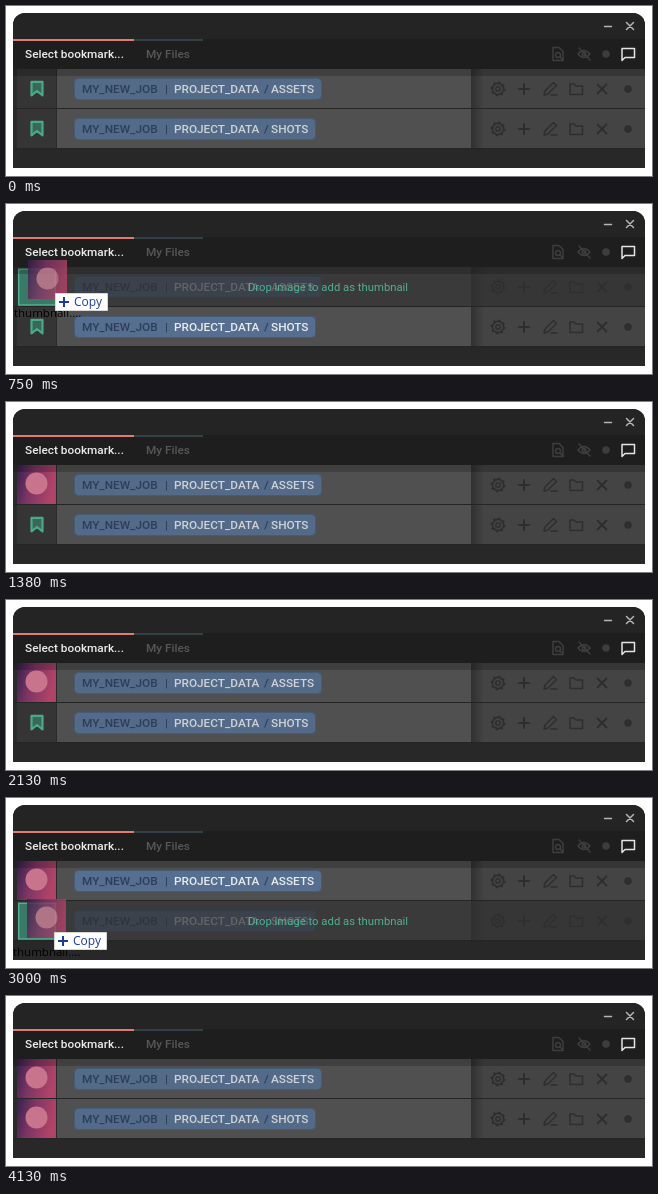
These frames come from a looping animation (646x170 px, 4260 ms). An HTML page:

```html
<!DOCTYPE html>
<html lang="en">
<head>
<meta charset="utf-8">
<title>Thumbnail drop</title>
<style>
  html, body { margin: 0; width: 100%; height: 100%; overflow: hidden; background: #fff; }
  svg { display: block; }
  text { font: 500 11.8px Roboto, sans-serif; }
  .line { fill: none; stroke-width: 1.5; stroke-linecap: round; stroke-linejoin: round; }
  .tools { stroke: #2e2e2e; }
  .dark { fill: #2b3f5a; }
  .light { fill: #cfd3d8; }
  .bright .light { fill: #e9ecef; }
  .bright .chip { fill: #566f90; }
  .hint { font-weight: 400; font-size: 11.3px; fill: #4fb092; text-anchor: middle; }
  .system { font: 400 11.5px "Open Sans", sans-serif; }
</style>
</head>
<body>
<svg id="stage" width="646" height="170" viewBox="0 0 646 170">
  <defs>
    <linearGradient id="art" x2="1" y2=".25">
      <stop offset="0" stop-color="#35204d"/>
      <stop offset=".45" stop-color="#7d3564"/>
      <stop offset="1" stop-color="#b04368"/>
    </linearGradient>
    <linearGradient id="side">
      <stop offset="0" stop-color="#303030"/>
      <stop offset="1" stop-color="#444"/>
    </linearGradient>
    <linearGradient id="under" x2="0" y2="1">
      <stop offset="0" stop-opacity=".22"/>
      <stop offset="1" stop-opacity="0"/>
    </linearGradient>
    <clipPath id="frame"><path d="M7 162V19a12 12 0 0 1 12-12H627a12 12 0 0 1 12 12V162z"/></clipPath>
    <clipPath id="floor"><path d="M0 0H646V162H0z"/></clipPath>
    <g id="thumb">
      <path fill="url(#art)" d="M0 0H39V39H0z"/>
      <circle cx="19.5" cy="18.5" r="11" fill="#c9748d"/>
    </g>
    <path id="mark" d="M25.5 12.8h11v13.6l-5.5-4.4-5.5 4.4z" fill="#376858" stroke="#4ba88b" stroke-width="2.2" stroke-linejoin="round"/>
    <path id="cross" d="M-4.5-4.5l9 9m0-9l-9 9"/>
    <path id="plus" d="M0-5V5M-5 0H5"/>
    <g id="tools" class="line tools">
      <circle cx="492" cy="20" r="5.6" stroke-width="1.7"/>
      <circle cx="492" cy="20" r="2.2"/>
      <circle cx="492" cy="20" r="6.8" stroke-width="1.4" stroke-dasharray="2.2 3.14" stroke-linecap="butt"/>
      <use href="#plus" x="518" y="20" stroke-width="2"/>
      <path d="M538 26l1-4 8.500-8.500 3 3-8.500 8.500-4 1M545 26h6"/>
      <path d="M564 15h4l2 2h6.500v8.500H564z"/>
      <use href="#cross" x="596" y="20" stroke-width="1.8"/>
      <circle cx="622" cy="20" r="3" fill="#2e2e2e"/>
    </g>
  </defs>

  <g clip-path="url(#frame)">
    <path fill="#282828" d="M0 0H646V170H0z"/>
    <path fill="#242424" d="M0 0H646V33H0z"/>
    <path fill="#1e1e1e" d="M0 33H646V63H0z"/>
    <path fill="#e17a72" d="M7 33H128V35H7z"/>
    <path fill="#344144" d="M128 33H197V35H128z"/>
    <g class="line" stroke="#b5b5b5" stroke-width="1.2">
      <path d="M598.500 20.500h7"/>
      <path d="M620.500 16.500l7 7m0-7l-7 7"/>
    </g>
    <text x="19" y="52" fill="#ececec">Select bookmark...</text>
    <text x="140" y="52" fill="#575757">My Files</text>
    <g class="line" stroke="#3d3d3d">
      <path d="M547 41.500h6l4 4v9h-10z"/>
      <circle cx="552" cy="49" r="2.500"/>
      <path d="M554 51l3 3M572 48q6-7 12 0q-6 7-12 0M573 42l11 12"/>
      <circle cx="578" cy="48" r="1.800"/>
      <circle cx="600" cy="48" r="3" fill="#3d3d3d"/>
      <path stroke="#e4e4e4" d="M616 42.500h12.500v9h-9.500l-3 3z"/>
    </g>
    <g id="rows"></g>
    <path fill="url(#under)" d="M7 63H639V70H7zM7 143H639V149H7z"/>
  </g>

  <g clip-path="url(#floor)">
    <g id="drag">
      <use href="#thumb" opacity=".82"/>
      <use id="add" href="#plus" x="40" y="44"/>
      <g id="tip">
        <text class="system" x="-14" y="57">thumbnail....</text>
        <path fill="#fff" stroke="#d5d5d5" d="M27.500 33.500h52v17h-52z"/>
        <use href="#plus" x="36" y="42" stroke="#1e3c9a" stroke-width="2"/>
        <text class="system" x="46" y="46" fill="#1e3c9a" style="font-size:12px">Copy</text>
      </g>
    </g>
  </g>
</svg>
<script>
const LOOP = 4260, STEP = 125;
const $ = id => document.getElementById(id);
const show = (el, on) => el.setAttribute('visibility', on ? 'inherit' : 'hidden');

const row = (y, name, width) => `
  <g transform="translate(0 ${y})">
    <path fill="#2b2b2b" d="M7 0H51V39H7z"/>
    <path fill="#353535" d="M11 0H50V39H11z"/>
    <path fill="#505050" d="M51 0H465V39H51z"/>
    <path fill="#444" d="M465 0H639V39H465z"/>
    <path fill="url(#side)" d="M465 0H478V39H465z"/>
    <use href="#mark" class="mark"/>
    <use href="#thumb" class="art" x="11"/>
    <rect class="chip" x="68.500" y="9.500" width="${width}" height="21" rx="4" fill="#536a88" stroke="#465b76"/>
    <text x="76" y="24" class="dark">MY_NEW_JOB</text>
    <text x="159" y="24" class="dark">|</text>
    <text x="168" y="24" class="light">PROJECT_DATA</text>
    <text x="258" y="24" class="dark">/</text>
    <text x="265" y="24" class="light">${name}</text>
    <use href="#tools"/>
    <g class="drop">
      <path fill="#303030" opacity=".68" d="M7 0H639V39H7z"/>
      <path fill="#397966" stroke="#4fb092" stroke-width="1.500" d="M12.700 2.200H49.500V38H12.700z"/>
      <text class="hint" x="322" y="24">Drop image to add as thumbnail</text>
    </g>
    <path fill="#252525" d="M7 39H639V40H7z"/>
  </g>`;
$('rows').innerHTML = row(63, 'ASSETS', 247) + row(103, 'SHOTS', 241);

// One drag per row: first step, step the row lights up, step the tip opens, then x,y per step.
const drags = [
  { start: 2, hover: 4, tip: 6,
    path: [[-30, 46], [-14, 40], [4, 35], [18, 33], [22, 56], [22, 62], [23, 67], [23, 70], [23, 71]] },
  { start: 19, hover: 21, tip: 22,
    path: [[-28, 126], [-14, 121], [-2, 113], [12, 107], [20, 103], [21, 101], [21, 100]] }
];
const rows = [...$('rows').children];
$('add').outerHTML = `<g id="add" class="line">
  <use href="#plus" x="40" y="44" stroke="#fff" stroke-width="5"/>
  <use href="#plus" x="40" y="44" stroke="#1e3c9a" stroke-width="2"/></g>`;

function draw(time) {
  const n = Math.min(33, Math.floor(time % LOOP / STEP));
  const active = drags.find(d => n >= d.start && n < d.start + d.path.length);
  const lit = active && n >= active.hover;

  rows.forEach((el, i) => {
    const d = drags[i], target = lit && d === active;
    const done = n >= d.start + d.path.length;
    show(el.querySelector('.drop'), target);
    show(el.querySelector('.mark'), !done);
    show(el.querySelector('.art'), done);
    el.classList.toggle('bright', !!lit && !target);
  });

  show($('drag'), active);
  if (active) {
    const [x, y] = active.path[n - active.start];
    $('drag').setAttribute('transform', `translate(${x} ${y})`);
  }
  show($('tip'), active && n >= active.tip);
  show($('add'), lit && n < active.tip);
}

const begin = performance.now();
function tick() {
  draw(performance.now() - begin);
  requestAnimationFrame(tick);
}
tick();
</script>
</body>
</html>
```
